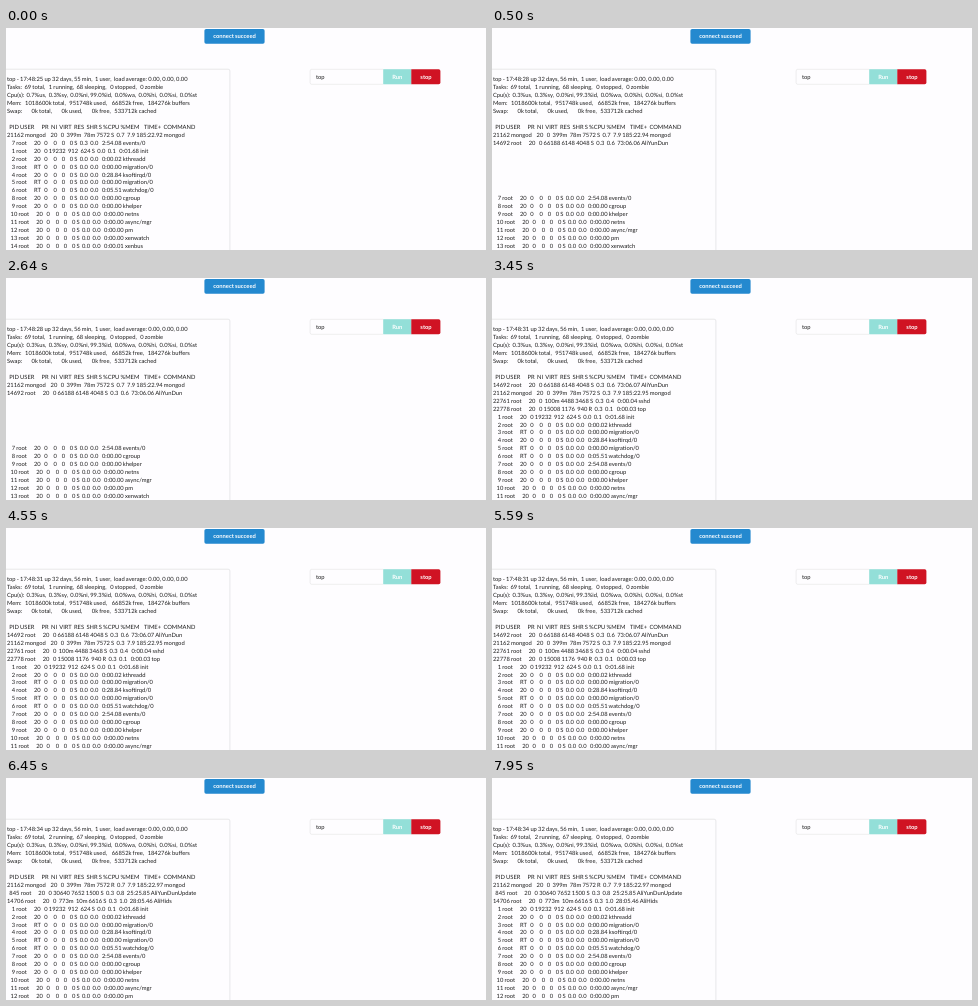
Animation, 480 px wide and 222 px high, one loop 8 s. Source, as an HTML page:

```html
<!DOCTYPE html>
<html lang="en">
<head>
<meta charset="utf-8">
<style>
html, body { margin: 0; width: 100%; height: 100%; overflow: hidden; background: #fefdff; }
svg { display: block; width: 100vw; height: 100vh; }
text { font: 5.8px Lato, sans-serif; word-spacing: -0.3px; white-space: pre; fill: #1c1c1c; text-rendering: geometricPrecision; }
.label { font-weight: 700; fill: #fff; text-anchor: middle; }
</style>
</head>
<body>
<svg viewBox="0 0 480 222">
  <rect width="480" height="222" fill="#fefdff"/>
  <rect x="198.4" y="1" width="60.2" height="14.7" rx="1.7" fill="#2489cf"/>
  <text class="label" x="228.5" y="10.2">connect succeed</text>
  <rect x="-3" y="41.2" width="226.9" height="190" rx="1.7" fill="#fefdff" stroke="#d9d9da" stroke-width="0.6"/>
  <g id="screen"></g>
  <path d="M377 41.3H305.7a1.6 1.6 0 0 0-1.6 1.6v11.8a1.6 1.6 0 0 0 1.6 1.6H377" fill="#fefdff" stroke="#dcdcdd" stroke-width="0.5"/>
  <text x="310" y="50.8">top</text>
  <rect x="377.2" y="41.2" width="28.3" height="15.1" fill="#93dfd8"/>
  <text class="label" x="391.3" y="50.8">Run</text>
  <path d="M405.3 41.2h27.4a1.7 1.7 0 0 1 1.7 1.7v11.7a1.7 1.7 0 0 1-1.7 1.7h-27.4z" fill="#d01323"/>
  <text class="label" x="420" y="50.8">stop</text>
</svg>
<script>
const LOOP = 8000, LINE = 7.93, FIRST = 53.4;
const screen = document.getElementById("screen");

const row = (pid, user, pr, virt, res, shr, state, cpu, mem, time, cmd) =>
  [String(pid).padStart(5), user.padEnd(8), pr.padStart(3), "  0", virt.padStart(5), res.padStart(4),
   shr.padStart(4), state, cpu.padStart(4), mem.padStart(4), time.padStart(9), cmd].join(" ");
const root = (pid, virt, res, shr, state, cpu, mem, time, cmd) =>
  row(pid, "root", "20", virt, res, shr, state, cpu, mem, time, cmd);
const mongod = (state, cpu, time) =>
  row(21162, "mongod", "20", "399m", "78m", "7572", state, cpu, "7.9", time, "mongod");
const cloud = time => root(14692, "66188", "6148", "4048", "S", "0.3", "0.6", time, "AliYunDun");
const kernel = (pid, cmd, time = "0:00.00", cpu = "0.0") =>
  row(pid, "root", /migration|watchdog/.test(cmd) ? "RT" : "20", "0", "0", "0", "S", cpu, "0.0", time, cmd);

const early = [
  root(1, "19232", "912", "624", "S", "0.0", "0.1", "0:01.68", "init"),
  kernel(2, "kthreadd", "0:00.02"),
  kernel(3, "migration/0"),
  kernel(4, "ksoftirqd/0", "0:28.84"),
  kernel(5, "migration/0"),
  kernel(6, "watchdog/0", "0:05.51")
];
const events = kernel(7, "events/0", "2:54.08");
const late = ["cgroup", "khelper", "netns", "async/mgr", "pm", "xenwatch"].map((cmd, i) => kernel(8 + i, cmd));

const summary = (clock, min, running, user, idle) => [
  `top - 17:48:${clock} up 32 days, ${min} min,  1 user,  load average: 0.00, 0.00, 0.00`,
  `Tasks:  69 total,   ${running} running,  ${69 - running} sleeping,   0 stopped,   0 zombie`,
  `Cpu(s):  ${user}%us,  0.3%sy,  0.0%ni, ${idle}%id,  0.0%wa,  0.0%hi,  0.0%si,  0.0%st`,
  "Mem:   1018600k total,   951748k used,    66852k free,   184276k buffers",
  "Swap:        0k total,        0k used,        0k free,   533712k cached",
  "",
  "  PID USER      PR  NI  VIRT  RES  SHR S %CPU %MEM    TIME+  COMMAND"
];

const states = [
  { at: 0, lines: [
    ...summary(25, 55, 1, "0.7", "99.0"),
    mongod("S", "0.7", "185:22.92"),
    kernel(7, "events/0", "2:54.08", "0.3"),
    ...early, ...late, kernel(14, "xenbus", "0:00.01")
  ] },
  { at: 450, lines: [
    ...summary(28, 56, 1, "0.3", "99.3"),
    mongod("S", "0.7", "185:22.94"), cloud("73:06.06"),
    ...Array(6).fill(""), events, ...late
  ] },
  { at: 3450, lines: [
    ...summary(31, 56, 1, "0.3", "99.3"),
    cloud("73:06.07"), mongod("S", "0.3", "185:22.95"),
    root(22761, "100m", "4488", "3468", "S", "0.3", "0.4", "0:00.04", "sshd"),
    root(22778, "15008", "1176", "940", "R", "0.3", "0.1", "0:00.03", "top"),
    ...early, events, ...late
  ] },
  { at: 6450, lines: [
    ...summary(34, 56, 2, "0.3", "99.3"),
    mongod("R", "0.7", "185:22.97"),
    root(845, "30640", "7652", "1500", "S", "0.3", "0.8", "25:25.85", "AliYunDunUpdate"),
    root(14706, "773m", "10m", "6616", "S", "0.3", "1.0", "28:05.46", "AliHids"),
    ...early, events, ...late
  ] }
];

const rows = Array.from({ length: 22 }, (_, i) => {
  const el = document.createElementNS("http://www.w3.org/2000/svg", "text");
  el.setAttribute("x", 1);
  el.setAttribute("y", FIRST + i * LINE);
  return screen.appendChild(el);
});

let shown;
function draw(now) {
  const t = now % LOOP;
  const state = states.findLast(s => s.at <= t);
  if (state !== shown) {
    rows.forEach((el, i) => { el.textContent = state.lines[i] || ""; });
    shown = state;
  }
}

const start = performance.now();
function tick() {
  draw(performance.now() - start);
  requestAnimationFrame(tick);
}
tick();
</script>
</body>
</html>
```
